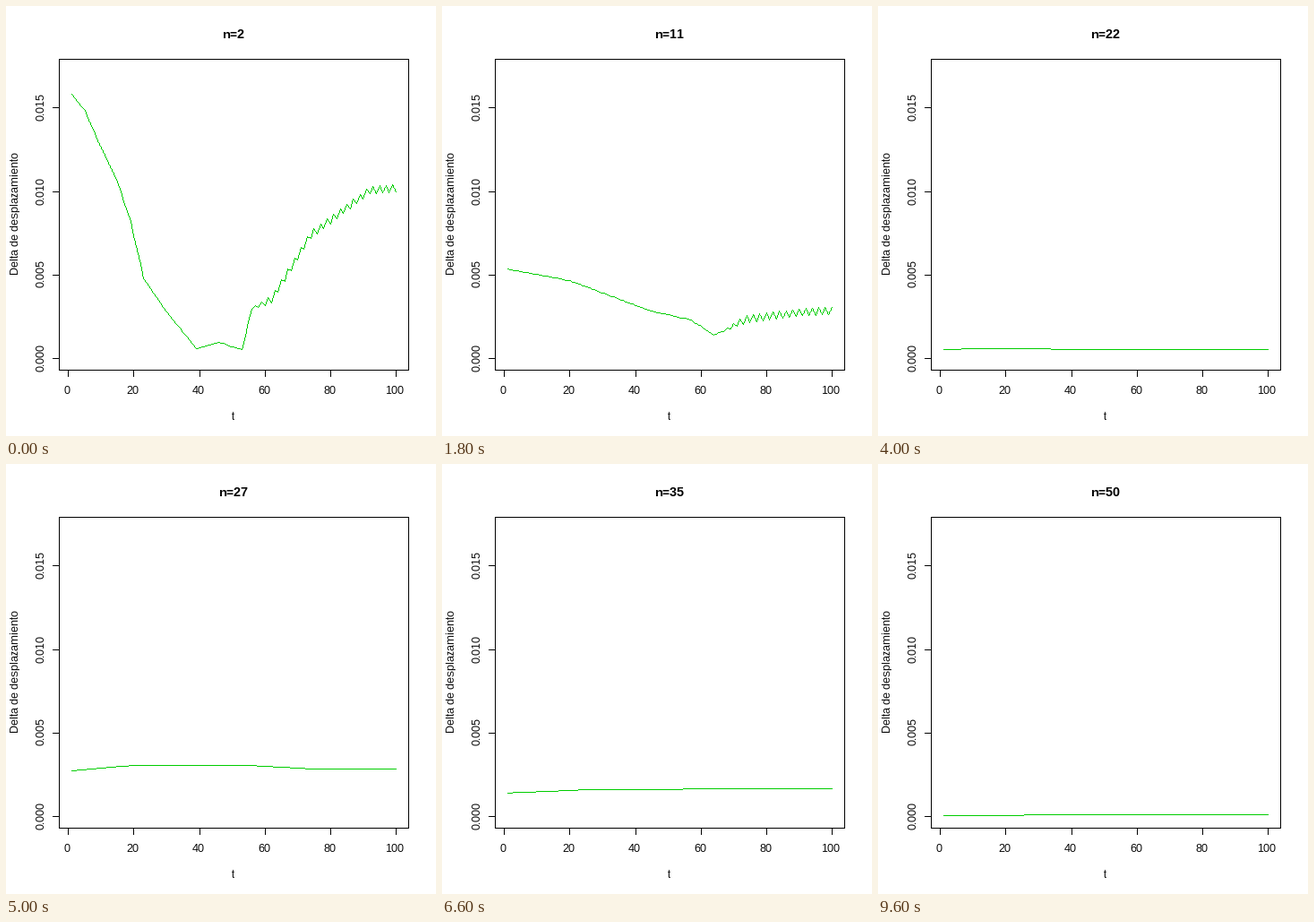
Recreate the animation shown at these times as a matplotlib script. Size 480 px wide and 480 px high, loop 9800 ms.

```python
import numpy as np
import matplotlib.pyplot as plt
from matplotlib.animation import FuncAnimation
from matplotlib.colors import to_rgba
from matplotlib.patches import Rectangle

SIZE, DPI = 480, 72
LEFT, RIGHT, TOP, BOTTOM = 59, 449, 59, 406
X0, DX = 69.86, 3.6543        # pixel of t=0, pixels per unit of t
Y0, DY = 393.69, 18667        # pixel of delta=0, pixels per unit of delta
T = np.arange(1, 101)
FIRST, LAST = 2, 50
LOW = 9                       # height the curve sinks to between key shapes
GREEN = to_rgba("#00cd00")

plt.rcParams.update({
    "font.family": "Liberation Sans",
    "text.hinting": "native",
    "text.hinting_factor": 1,
})

# A few (t, height in pixels) points for the shape at some values of n.
SHAPES = {
    2: [(1, 295), (5, 277), (9, 243), (15, 197), (19, 153), (23, 89),
        (30, 52), (39, 11.5), (46, 18), (53, 10), (56, 56), (62, 66),
        (74, 138), (92, 188), (100, 190)],
    11: [(1, 100), (20, 87), (44, 54), (57, 43), (64, 26), (74, 44),
         (92, 52.5), (100, 53)],
    18: [(1, 73), (16, 82), (26, 79), (45, 61), (52, 64), (85, 44),
         (93, 38), (100, 40)],
    27: [(1, 51.3), (19, 57), (56, 57), (76, 53), (100, 53)],
    35: [(1, 26.4), (23, 29.7), (55, 30.7), (100, 31.2)],
    42: [(1, 8.2), (17, 9.7), (64, 11.7), (100, 12.3)],
    50: [(1, 1.2), (26, 1.7), (100, 2)],
}
KEYS = sorted(SHAPES)


def shape(n):
    return np.interp(T, *zip(*SHAPES[n]))


def zigzag(n):
    """Oscillation over t, whose onset moves right as n grows."""
    onset = 54 + 0.14 * (n - 2) ** 2
    amp = 4 * np.clip((T - onset) / 8, 0, 1)
    return amp * np.cos(np.pi * (T + (n + 1) // 3))


def heights(n):
    a = max(k for k in KEYS[:-1] if k <= n)
    b = KEYS[KEYS.index(a) + 1]
    s = (n - a) / (b - a)
    base = shape(a) ** (1 - s) * shape(b) ** s
    sink = min(1, a / 18) * np.sin(np.pi * s) ** 2
    base += sink * (np.minimum(base, LOW) - base)
    return base + zigzag(n)


def trace(x, y):
    """Pixels of a hard-edged line through the given points."""
    x, y = np.floor(x), np.floor(y)
    for i in range(len(x) - 1):
        steps = int(max(abs(x[i + 1] - x[i]), abs(y[i + 1] - y[i]))) + 1
        cols = np.linspace(x[i], x[i + 1], steps).round().astype(int)
        rows = np.linspace(y[i], y[i + 1], steps).round().astype(int)
        yield rows, cols


fig = plt.figure(figsize=(SIZE / DPI, SIZE / DPI), dpi=DPI, facecolor="white")
ax = fig.add_axes([0, 0, 1, 1])
ax.axis("off")
layer = ax.imshow(np.zeros((SIZE, SIZE, 4)), extent=(0, SIZE, SIZE, 0),
                  interpolation="nearest", aspect="auto")
ax.set_xlim(0, SIZE)
ax.set_ylim(SIZE, 0)


def tick(x, y):
    ax.plot(x, y, color="black", lw=1, antialiased=False,
            solid_capstyle="butt")


def label(x, y, text, size=12, **kw):
    return ax.text(x, y, text, fontsize=size, ha="center", va="baseline",
                   rotation_mode="anchor", **kw)


ax.add_patch(Rectangle((LEFT, TOP), RIGHT - LEFT, BOTTOM - TOP, fill=False,
                       ec="black", lw=1, antialiased=False))

for t in range(0, 101, 20):
    x = int(X0 + t * DX)
    tick([x, x], [BOTTOM, BOTTOM + 7])
    label(x - 1, 433, str(t))

for i in range(4):
    delta = i * 0.005
    y = int(Y0 - delta * DY)
    tick([LEFT - 7, LEFT], [y, y])
    label(43, y - 1, f"{delta:.3f}", rotation=90)

label(253, 462, "t")
label(14, 232, "Delta de desplazamiento", rotation=90)
title = label(254, 36, "", size=14, weight="bold")


def draw(i):
    n = FIRST + i
    title.set_text(f"n={n}")
    pixels = np.zeros((SIZE, SIZE, 4))
    for rows, cols in trace(X0 + T * DX, Y0 - heights(n)):
        pixels[rows, cols] = GREEN
    layer.set_data(pixels)
    return layer, title


anim = FuncAnimation(fig, draw, frames=LAST - FIRST + 1, interval=200,
                     repeat=True, repeat_delay=0, blit=False)
plt.show()
```
